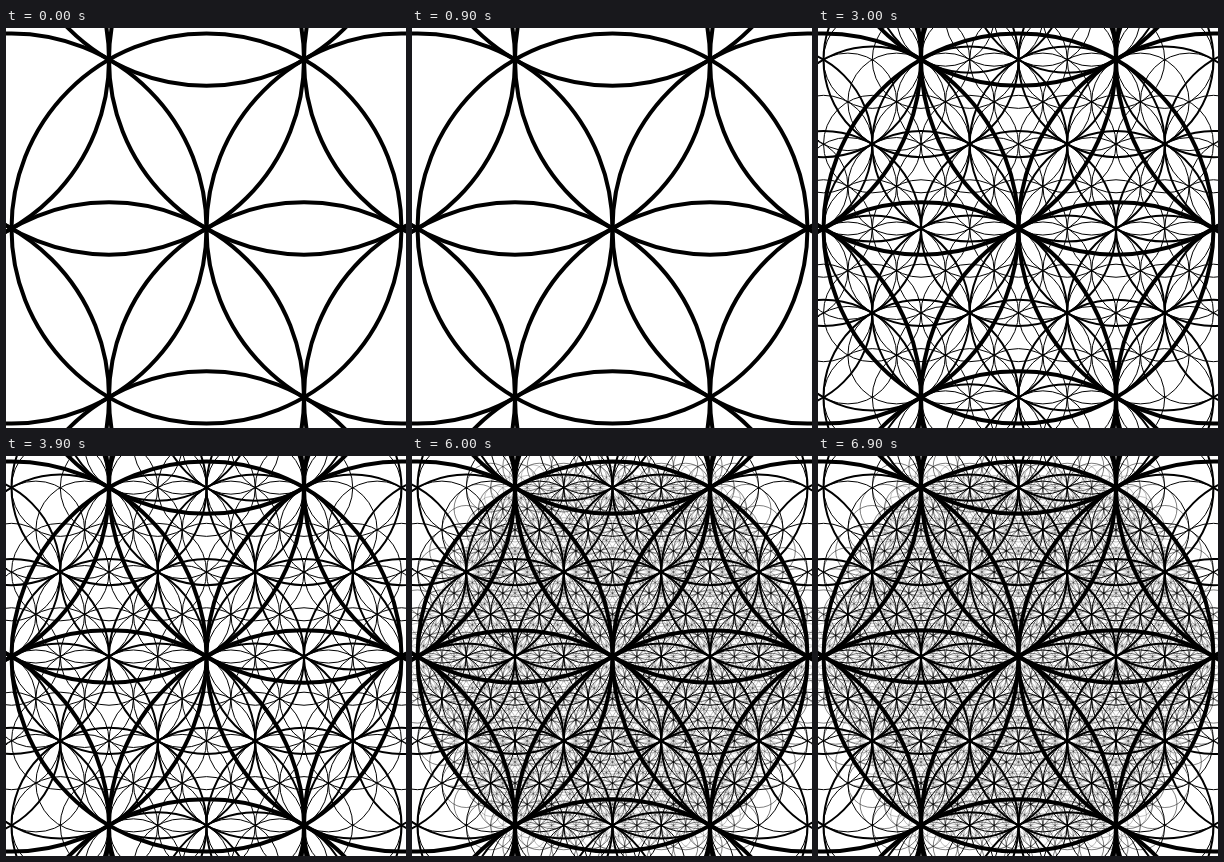
Animation, 400 px wide and 400 px high, one loop 7500 ms. Source, as an HTML page with a canvas:

```html
<!DOCTYPE html>
<html lang="en">
<head>
<meta charset="utf-8">
<title>Flower of circles</title>
<style>
  html, body { margin: 0; width: 100%; height: 100%; overflow: hidden; background: #fff; }
  canvas { display: block; }
</style>
</head>
<body>
<canvas id="stage" width="400" height="400"></canvas>
<script>
const ctx = document.getElementById('stage').getContext('2d');
const CENTER = 200.5, RADIUS = 195, LINE = 4, STEP = 1500, LEVELS = 5;

// Circles on a triangular lattice: a hexagon of n rings plus one outer ring without corners.
function drawLevel(level) {
  const n = 2 ** level, size = RADIUS / n, edge = n + 1;
  ctx.lineWidth = LINE / n;
  for (let r = -edge; r <= edge; r++) {
    for (let q = -edge; q <= edge; q++) {
      const s = -q - r;
      const ring = Math.max(Math.abs(q), Math.abs(r), Math.abs(s));
      if (ring > edge || (ring === edge && q * r * s === 0)) continue;
      ctx.beginPath();
      ctx.arc(CENTER + size * (q + r / 2), CENTER + size * r * Math.sqrt(3) / 2, size, 0, 2 * Math.PI);
      ctx.stroke();
    }
  }
}

function draw(depth) {
  ctx.fillStyle = '#fff';
  ctx.fillRect(0, 0, 400, 400);
  ctx.strokeStyle = '#000';
  for (let level = 0; level <= depth; level++) drawLevel(level);
}

const start = performance.now();
let shown = -1;

function tick() {
  const depth = Math.floor((performance.now() - start) / STEP) % LEVELS;
  if (depth !== shown) draw(shown = depth);
  requestAnimationFrame(tick);
}
tick();
</script>
</body>
</html>
```
